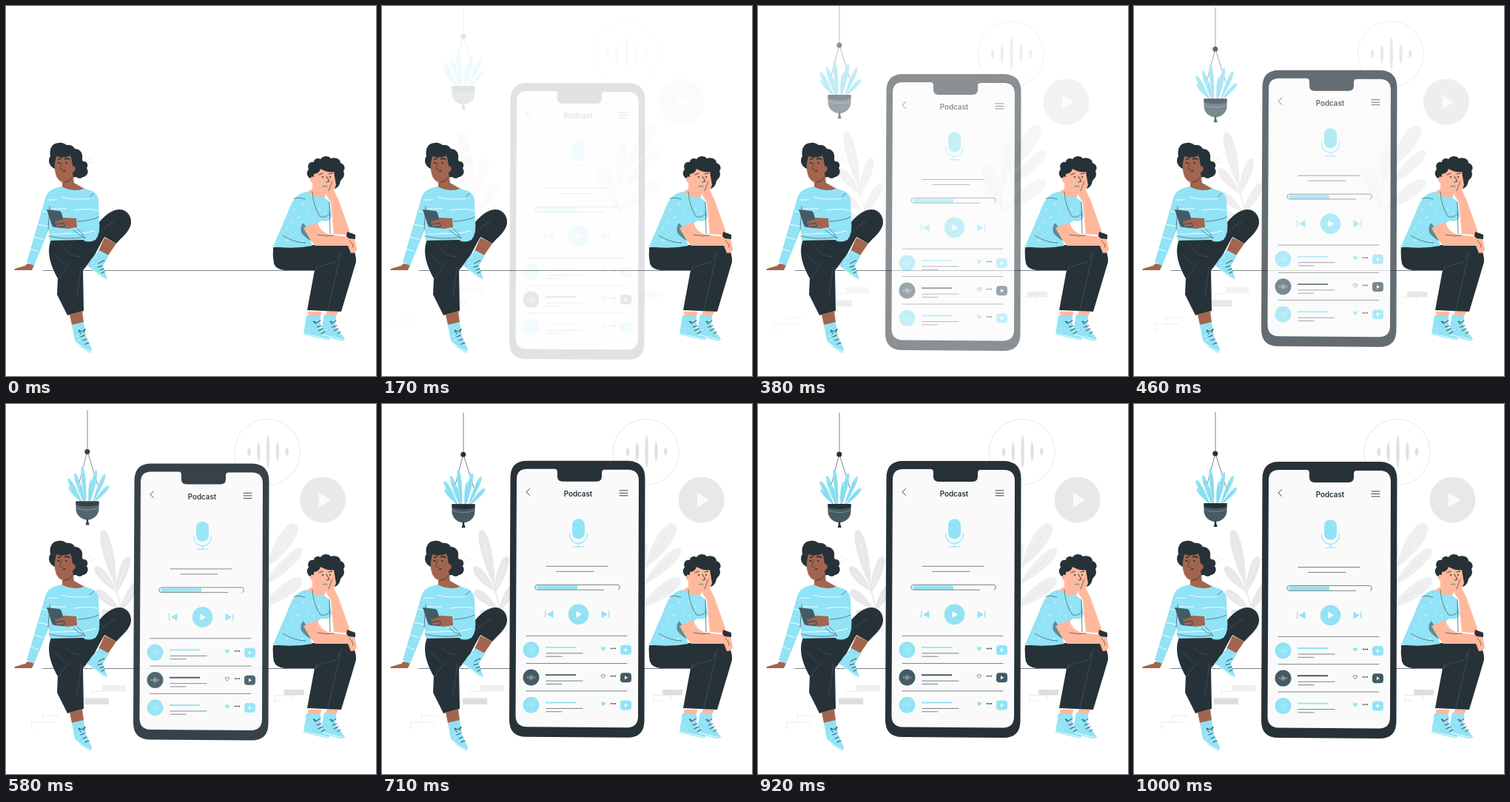
Recreate the animation shown at these times as an HTML page. Size 500x500 px, loop 1.04 s.

```html
<!DOCTYPE html>
<html lang="en">
<head>
<meta charset="utf-8">
<title>Podcast listeners</title>
<style>
  html, body { margin: 0; width: 100%; height: 100%; overflow: hidden; background: #fff; }
  svg { display: block; width: 100%; height: 100%; }
  .dark { fill: #263238; }
  .slate { fill: #455a64; }
  .blue { fill: #92e3f5; }
  .brown { fill: #a2654f; }
  .skin { fill: #ffb89b; }
  .ink, .thin, .fold, .stripe, .shade { fill: none; stroke-linecap: round; stroke-linejoin: round; }
  .ink { stroke: #263238; stroke-width: .9; }
  .thin { stroke: #263238; stroke-width: .6; }
  .fold { stroke: #455a64; stroke-width: .7; }
  .stripe { stroke: #fff; stroke-width: .9; }
  .shade { stroke: #e4e4e4; stroke-width: .8; }
</style>
</head>
<body>
<svg viewBox="0 0 500 500" xmlns="http://www.w3.org/2000/svg">
  <g id="backdrop">
    <circle cx="355.5" cy="65" r="44.5" fill="#fff" stroke="#e0e0e0" stroke-width=".8"/>
    <g id="bigWave"></g>
    <circle cx="430.5" cy="129.5" r="31" fill="#e8e8e8"/>
    <path d="M425 120.500Q425 119.500 426.500 120.500L440 128.500Q441.500 129.500 440 130.500L426.500 138.500Q425 139.500 425 138Z" fill="#fafafa"/>
    <g id="foliage"></g>
    <path d="M108 397.500h33v8.500h-33zM378 386h27v7.500h-27z" fill="#dedede"/>
    <path d="M132 380h32v8.500h-32z" fill="#efefef"/>
    <path class="shade" d="M132 388.500h-14v9M37 438v-8h15v-9h22M52 430h18M37 438h3M366 401v-7.500h24v7M366 401h10"/>
  </g>

  <path d="M50 357.500H420" class="thin" stroke-width=".8"/>

  <g id="plant">
    <path class="thin" d="M110 11V64M109 70L98 112M111 70L124 112"/>
    <circle class="dark" cx="109.800" cy="67" r="3.500"/>
    <g id="fronds"></g>
    <path class="slate" d="M94.500 134H125.500V144C125.500 152 119 159 110 159S94.500 152 94.500 144Z"/>
    <path class="dark" d="M94.500 134H125.500V139Q110 143 94.500 139ZM108.800 158h2.400v3l1.500 5h-5l1.200-5z"/>
    <path d="M96 143Q110 148 124 143" fill="none" stroke="#92a0a6" stroke-width=".7"/>
  </g>

  <g id="phone">
    <path class="dark" d="M196 78H333Q355.500 79 355.500 102L354.500 429Q354.500 452 332 452L195 451Q172 451 172 428L173.500 101Q173.500 78 196 78Z"/>
    <path fill="#fafafa" d="M196 89H233Q237 89 237 93V99Q237 106 244 106H290Q297 106 297 99V94Q297 90 301 90H332Q347 90 347 105L346 423Q346 438.500 331 438.500L195 437.500Q180.500 437 180.500 422L182 103Q182 89 196 89Z"/>
    <path class="ink" d="M199.500 115.500L195 120L199.500 124.500M321 118H332M321 121.500H332M321 125H332"/>
    <text x="265" y="126.200" text-anchor="middle" class="dark" font-family="Inter, 'Open Sans', sans-serif" font-size="9.800" font-weight="600">Podcast</text>
    <rect class="blue" x="257" y="156.500" width="17" height="27" rx="8"/>
    <path d="M253.500 175.500C253 194 278 194 277.500 175.500M265.500 189V194M258 194H273" fill="none" stroke="#92e3f5" stroke-width="1.200"/>
    <path class="thin" d="M222 220.500H305M236 227.500H286"/>
    <path class="blue" d="M210.500 246.500H264V252H210.500Q207.800 249 210.500 246.500Z"/>
    <path class="thin" d="M300 252.300H210Q206.500 252 206.800 248.500Q207 245.500 210.500 245.500H318Q321 245.500 321.500 248.500Q321.500 251.500 319 252.300"/>
    <circle class="blue" cx="265.500" cy="285.500" r="13.800"/>
    <path d="M262.500 281V290L270 285.500Z" fill="#fff"/>
    <path class="blue" d="M220 281h1.400v9h-1.400zM231.500 280.500v10l-8.500-5zM296.500 280.500v10l8.500-5zM306 281h1.400v9h-1.400z"/>
    <g id="episodes"></g>
  </g>

  <g id="woman">
    <path class="shade" d="M104 211Q112 210 116 204M108 215Q115 212 119 210"/>
    <path class="dark" d="M60 203C58 194 62 185 71 185C77 184 80 187 82 188C89 187 92 191 93 193C101 193 104 200 103 205C103 208 103 210 106 210C111 211 111 217 109 219C113 224 109 231 104 231C101 234 96 233 95 231L82 233L66 220C58 217 56 208 60 203Z"/>
    <path class="brown" d="M68 203C76 206 83 204 87 202C89 206 89 211 90 216C95 216 95 223 90 225L92 239L108 248Q95 255 76 247V238C67 235 65 222 66 213Z"/>
    <path class="dark" d="M70 207L75 205L75 206.500L70 208.500ZM79 206Q83 204 87 207L86 208Q83 206.500 79 207.500Z"/>
    <circle class="dark" cx="71" cy="212" r="1.200"/><circle class="dark" cx="81.500" cy="212" r="1.200"/>
    <path class="thin" d="M75 211L73 220L76 220.500"/>
    <path d="M76 223L81 222Q80 226 76 223Z" fill="#5b2d27"/>
    <path d="M78 237Q86 237 90 230Q90 237 79 239Z" fill="#7b4839"/>
    <path class="brown" d="M29 348L38 350L35 357H12Q9 356 15 354L26 351Z"/>
    <path class="dark" d="M62 314L108 312C121 299 133 280 147 276C160 272 170 281 169 294C167 305 157 312 149 321L133 312Q123 330 117 342L104 357L105 412L83 418L69 390L70 368C59 349 54 329 62 314Z"/>
    <path class="fold" d="M106 319C117 317 132 297 147 291M102 338Q91 342 80 328M102 352L96 392M70 370L87 346M66 336L79 348"/>
    <path class="blue" d="M75 244C66 246 58 248 54 257L28 346L38 351L58 302L59 317L104 316Q111 321 121 316Q128 308 126 289L125 262Q123 249 105 247Q91 252 75 244Z"/>
    <path class="stripe" d="M57 262H69M75 258Q90 263 113 260M62 274H81M92 276Q110 273 124 276M80 307Q101 309 120 304M61 308L80 308M43 295L57 298M38 312L51 316M33 328L44 332M49 277L59 280"/>
    <path class="fold" d="M59 271L57 302M113 258L119 253M58 311Q80 316 103 313M97 291Q116 290 125 285"/>
    <path class="brown" d="M65 291L78 286L95 287L96 299L83 301L69 299L65 296Z"/>
    <path class="slate" d="M55 275L72 277Q74 277 75 280L80 297Q80 300 76 300L66 299Q63 299 62 296Z"/>
    <path class="brown" d="M65 292L77 288L83 289L79 292L68 294ZM67 296L79 294L77 298L68 298Z"/>
    <path class="fold" d="M96 301Q104 307 107 314Q99 309 91 303"/>
    <path class="brown" d="M133 313L149 321L138 337L125 331Z"/>
    <path class="blue" d="M126 330L139 337L131 351L137 369L132 368L109 351L116 341Z"/>
    <path class="brown" d="M86 417L103 412L105 428L89 431Z"/>
    <path class="blue" d="M89 431L105 427L108 446L116 464L114 469L101 461L93 452Z"/>
    <path class="stripe" d="M109 351L134 368M93 453Q103 462 114 467"/>
    <path class="ink" d="M125 348L130 345L133 344M124 353L130 351M129 361L133 359M127 357L132 355M101 443L98 438L103 440L107 436L105 441M101 447L106 445M104 452L109 450M107 457L112 455"/>
    <path class="stripe" d="M117 347h1M96 446h1M98 452h1M121 338h1"/>
  </g>

  <g id="man">
    <path class="dark" d="M413 234C405 231 406 223 409 221C406 213 412 210 416 211C416 206 422 205 425 207C428 202 436 202 439 206C445 204 452 207 452 212C458 214 459 220 456 223C459 230 454 234 452 236C451 244 446 248 440 247L428 226Z"/>
    <path class="skin" d="M416 227Q423 227 425 220Q436 226 443 224L446 242Q443 253 433 253L428 263Q415 261 406 252L414 247V239C409 237 411 228 416 231Z"/>
    <path class="ink" d="M423 228L428 226M436 227L441 226M433 230L437 237L433 238"/>
    <circle class="dark" cx="428" cy="231" r="1.100"/><circle class="dark" cx="438" cy="231" r="1.100"/>
    <circle class="blue" cx="430.500" cy="240" r="1.600"/>
    <path class="thin" d="M428 244Q431 242 434 244"/>
    <path class="skin" d="M408 413L426 413L424 425L409 423ZM434 412L449 413L444 424L431 421Z"/>
    <path class="blue" d="M406 418L425 419L425 435L437 449Q437 452 432 451L402 444ZM430 417L446 419L445 433L458 450Q457 453 452 452L425 445Z"/>
    <path class="stripe" d="M403 443L435 450M427 444L456 451M408 436h1M411 440h1M432 438h1"/>
    <path class="ink" d="M419 430L415 426L420 428L425 425M420 434L426 432M422 439L428 436M426 443L431 440M441 430L438 426L442 428L446 425M441 434L447 432M443 439L449 436M448 443L452 440"/>
    <path class="dark" d="M361 326L415 323L465 324Q474 333 473 346L453 413L407 411L417 357H376Q365 356 362 348Q360 337 361 326Z"/>
    <path class="fold" d="M417 357Q427 349 444 347Q451 338 454 331M452 337L435 411M418 357L421 350"/>
    <path class="blue" d="M405 251C391 255 386 264 380 281L361 325Q387 329 414 324L407 304L426 290Q439 293 440 283L437 264L428 257Q421 261 410 253Z"/>
    <path class="stripe" d="M389 274h1M401 268h2M394 286l2-1M407 278h1M379 301l1-1M391 306h1M415 286l1 1M414 267h1M379 317l2-1M400 317h1M423 274h1M402 294h1M385 293h1M430 280h1"/>
    <path class="slate" d="M402 293Q407 303 413 310L421 321Q404 315 399 306Q397 297 402 293Z" opacity=".65"/>
    <path class="fold" d="M389 260Q396 258 404 261M414 251C415 267 420 278 425 285Q433 287 438 280M374 310Q389 320 405 320"/>
    <path d="M426 291L438 290L444 308L430 309Z" fill="#fff"/>
    <path class="skin" d="M434 247L441 236Q445 241 442 247L449 261L464 303Q463 311 457 309L443 308L439 265L433 256Z"/>
    <path class="thin" d="M441 237Q438 244 436 250M437 265L438 308"/>
    <path class="skin" d="M402 300L421 292Q424 305 437 309L463 312L471 314L474 328Q473 334 466 334L462 324L418 324Q410 315 402 300Z"/>
    <path class="dark" d="M461 305L472 309L472 315L463 314L460 311Z"/>
    <path class="thin" d="M464 317Q469 320 469 326M421 309Q433 312 443 310"/>
  </g>
</svg>
<script>
const LOOP = 1040, FPS = 24, DISTANCE = 30, LEAD = 0.025;
const el = id => document.getElementById(id);
const range = n => [...Array(n).keys()];

// Pointed or blunt blade running from a base to a tip
function blade([x1, y1, x2, y2, width], fill, vein) {
  const dx = x2 - x1, dy = y2 - y1, len = Math.hypot(dx, dy);
  const nx = -dy / len * width, ny = dx / len * width;
  const at = (k, side) => `${x1 + dx * k + nx * side} ${y1 + dy * k + ny * side}`;
  return `<path d="M${x1} ${y1}C${at(.45, .8)} ${at(1, .8)} ${x2} ${y2}C${at(1, -.8)} ${at(.45, -.8)} ${x1} ${y1}Z" fill="${fill}"/>
    <path d="M${x1} ${y1}L${at(.8, 0)}" fill="none" stroke="${vein}" stroke-width=".6"/>`;
}

const wave = (cx, cy, step, width, heights, fill) => heights.map((h, i) =>
  `<ellipse cx="${cx + (i - (heights.length - 1) / 2) * step}" cy="${cy}" rx="${width / 2}" ry="${h / 2}" fill="${fill}"/>`).join('');

function episode(row) {
  const y = 333 + row * 37.3, active = row === 1;
  const color = active ? '#455a64' : '#92e3f5';
  const heart = `M299 ${y + 1.5}l-2.600-2.700q-.7-2 1-2.300q1.200 0 1.600 1.200q.5-1.200 1.700-1.200q1.700.4.9 2.300z`;
  return `<path class="thin" d="M195 ${y - 18.6}H331"/>
    <circle cx="201.500" cy="${y + .3}" r="11" fill="${color}"/>
    ${wave(201.5, y + .3, 2.4, .8, [2, 5, 8, 5, 2], active ? '#fff' : '#c9f2fa')}
    <path d="M221 ${y - 3}H262" stroke="${color}" stroke-width="1.900"/>
    <path class="thin" d="M222 ${y + 5}H271M222 ${y + 9.3}H243"/>
    <path d="${heart}" fill="${active ? 'none' : color}" stroke="${color}" stroke-width=".7"/>
    ${range(3).map(i => `<circle class="dark" cx="${309.8 + i * 2.7}" cy="${y - 1.5}" r=".9"/>`).join('')}
    <rect x="322" y="${y - 6}" width="15" height="13" rx="4" fill="${color}"/>
    <path d="M328 ${y - 2}v5l4-2.500z" fill="#fff"/>`;
}

el('bigWave').innerHTML = wave(356.5, 64.5, 12.8, 4.4, [11, 25, 44, 25, 10], '#e0e0e0');

const stems = [
  [151, 246, 133, 170, 12], [150, 258, 168, 206, 10], [152, 254, 123, 220, 10],
  [155, 277, 124, 252, 10], [155, 282, 181, 240, 10], [164, 305, 132, 279, 10]
];
const paleStems = [
  [354, 222, 394, 162, 17], [350, 246, 402, 196, 13], [346, 277, 402, 236, 15],
  [345, 275, 321, 216, 17], [345, 248, 352, 184, 12]
];
el('foliage').innerHTML =
  stems.map(s => blade(s, '#e8e8e8', '#f7f7f7')).join('') +
  '<path d="M142 205Q151 255 168 310" fill="none" stroke="#e8e8e8" stroke-width="1.500"/>' +
  paleStems.map(s => blade(s, '#efefef', '#dfdfdf')).join('');

const frondTips = [
  [84, 103], [85, 114], [93, 96], [103, 87], [139, 113],
  [134, 97], [122, 92], [116, 104], [98, 108]
];
el('fronds').innerHTML = frondTips.map(([x, y]) =>
  blade([110 + (x - 110) * .3, 135, x, y, 4.8], '#92e3f5', '#65bccd')).join('');

el('episodes').innerHTML = range(3).map(episode).join('');

// Cubic bezier easing (.36, -.01, .5, 1.38), solved by bisection
function overshoot(x) {
  if (x >= 1) return 1;
  const curve = (s, a, b) => 3 * (1 - s) ** 2 * s * a + 3 * (1 - s) * s * s * b + s ** 3;
  let low = 0, high = 1;
  for (let i = 0; i < 30; i++) {
    const mid = (low + high) / 2;
    if (curve(mid, .36, .5) < x) low = mid; else high = mid;
  }
  return curve(low, -.01, 1.38);
}

function place(id, dx, dy, opacity) {
  el(id).setAttribute('transform', `translate(${dx} ${dy})`);
  el(id).setAttribute('opacity', opacity);
}

function draw(ms) {
  const step = Math.floor((ms % LOOP + 5) * FPS / 1000);
  const progress = step < 2 ? 0 : overshoot(step / FPS + LEAD);
  const shift = DISTANCE * (1 - progress);
  const opacity = Math.min(1, Math.max(0, progress));
  place('phone', 0, shift, opacity);
  place('plant', 0, -shift, opacity);
  place('backdrop', -shift, 0, opacity);
}

const start = performance.now();
function tick() {
  draw(performance.now() - start);
  requestAnimationFrame(tick);
}
draw(0);
tick();
</script>
</body>
</html>
```
